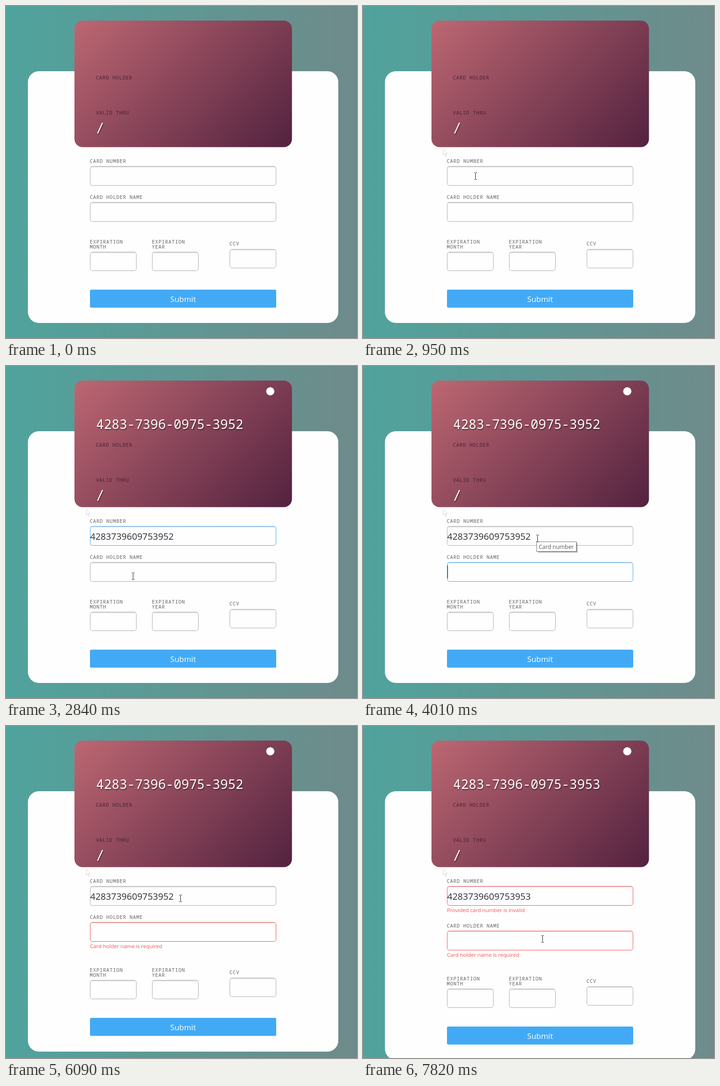
An HTML page that plays this animation: 769 by 728 pixels, repeating every 8 s.

```html
<!DOCTYPE html>
<html lang="en">
<head>
<meta charset="utf-8">
<title>Card form</title>
<style>
html, body { margin: 0; height: 100%; overflow: hidden; }
svg { display: block; width: 769px; height: 728px; }
text { font-family: "Open Sans", "Noto Sans", sans-serif; white-space: pre; }
.label { font: 300 11px "Noto Sans Mono", monospace; letter-spacing: .67px; fill: #666; }
.dark { fill: #4b2134; font-weight: 400; }
.field { fill: url(#inset); stroke: #aaa; }
.error { font-size: 11.6px; fill: #f4504d; }
.number { font: 28.3px "Noto Sans Mono", monospace; }
.slash { font: 28px "DejaVu Sans Mono", monospace; }
.lift { fill: #fff; filter: drop-shadow(1px 2px 1px #0007); }
</style>
</head>
<body>
<svg viewBox="0 0 769 728">
  <defs>
    <linearGradient id="page"><stop stop-color="#50a39d"/><stop offset="1" stop-color="#6e8b8a"/></linearGradient>
    <linearGradient id="card" gradientUnits="userSpaceOnUse" x1="199.75" y1="-17.75" x2="576.25" y2="358.75">
      <stop stop-color="#bd6772"/><stop offset="1" stop-color="#53223f"/>
    </linearGradient>
    <linearGradient id="inset" x2="0" y2="1">
      <stop stop-color="#ccc"/><stop offset=".05" stop-color="#eee"/><stop offset=".1" stop-color="#fefefe"/>
    </linearGradient>
    <path id="arrow" d="M.5 .5V13.5L3.5 10.7 5.5 16 7.5 15.2 5.5 10H9.5Z" fill="#fff"/>
  </defs>
  <rect width="769" height="728" fill="url(#page)"/>
  <rect id="panel" x="48" y="143" width="680" rx="24" fill="#fefefe"/>

  <text class="label" x="183.5" y="344">CARD NUMBER</text>
  <rect id="numField" class="field" x="184.5" y="351.5" width="407" height="42" rx="5"/>
  <text id="typed" x="184.5" y="381" font-size="20" fill="#2e2e36"></text>
  <text id="numError" class="error" x="184" y="408">Provided card number is invalid</text>

  <g data-y="430.2">
    <text class="label" x="183.5" y="-7">CARD HOLDER NAME</text>
    <rect id="nameField" class="field" x="184.5" y=".5" width="407" height="42" rx="5"/>
    <text id="nameError" class="error" x="184" y="57">Card holder name is required</text>
  </g>
  <g data-y="538.6">
    <text class="label" x="183.5" y="-18">EXPIRATION</text>
    <text class="label" x="183.5" y="-7.5">MONTH</text>
    <rect class="field" x="184.5" y=".5" width="101" height="41" rx="5"/>
    <text class="label" x="319.5" y="-18">EXPIRATION</text>
    <text class="label" x="319.5" y="-7.5">YEAR</text>
    <rect class="field" x="320.5" y=".5" width="101" height="41" rx="5"/>
  </g>
  <g data-y="533.3">
    <text class="label" x="489.5" y="-8">CCV</text>
    <rect class="field" x="490.5" y=".5" width="101" height="41" rx="5"/>
  </g>
  <g data-y="621.6">
    <rect x="184" width="408" height="39.5" rx="3" fill="#42aaf5"/>
    <text x="388" y="26.5" font-size="17" fill="#fff" text-anchor="middle">Submit</text>
  </g>

  <rect x="150" y="32" width="476.5" height="277.5" rx="18" fill="url(#card)"/>
  <g id="brand">
    <circle cx="579" cy="55.5" r="9" fill="#fff"/>
    <text id="cardNum" class="number lift" x="197.5" y="138"></text>
  </g>
  <g id="details">
    <text class="label dark" x="197" y="160.5">CARD HOLDER</text>
    <text class="label dark" x="197" y="237.5">VALID THRU</text>
    <text class="slash lift" x="198" y="276.5">/</text>
  </g>

  <use id="trace" href="#arrow" x="175.5" y="313.5" stroke="#ddd0d4"/>
  <rect id="caret" width="1" height="29" fill="#1d2b33"/>
  <g id="tip">
    <rect x="383" y="388" width="87" height="21" fill="#0005"/>
    <rect x="380.5" y="385.5" width="87" height="21" fill="#fff" stroke="#767676"/>
    <text x="385" y="400.5" font-size="12.4" fill="#575757">Card number</text>
  </g>
  <use id="pointer" href="#arrow" stroke="#000"/>
  <path id="beam" d="M-3 -7.5H-1L0 -6.5 1 -7.5H3M0 -6.5V6.5M-3 7.5H-1L0 6.5 1 7.5H3" fill="none" stroke="#111"/>
</svg>
<script>
const $ = id => document.getElementById(id);
const show = (id, on) => $(id).style.display = on ? '' : 'none';
const at = (el, x, y) => el.setAttribute('transform', `translate(${x} ${y})`);
const rows = document.querySelectorAll('[data-y]');
const ROW = 18.6, BLUE = '#42a5f5', RED = '#f4504d', GRAY = '#aaa';

// start, end, from x, y, to x, y, sideways bulge
const moves = [
  [110, 950, 3, 170, 247, 373, 0],
  [2330, 2840, 247, 373, 279, 461, 0],
  [3170, 3630, 279, 461, 383, 378, 0],
  [7490, 7820, 383, 378, 394, 467, 23],
];
// on, off, x, y
const carets = [
  [1230, 1690, 185, 358], [1970, 2480, 368, 358],
  [2940, 3450, 185, 437], [3960, 4520, 185, 437],
  [4520, 5070, 368, 358], [5580, 6090, 368, 358],
  [6370, 6650, 356, 358], [6980, 7490, 368, 358],
];

function cursor(t) {
  const [a, b, x0, y0, x1, y1, bulge] = moves.filter(m => t >= m[0]).pop() || moves[0];
  const p = Math.max(0, Math.min(1, (t - a) / (b - a)));
  const e = p * p * (3 - 2 * p);
  return [x0 + (x1 - x0) * e + bulge * Math.sin(Math.PI * e), y0 + (y1 - y0) * e].map(Math.round);
}

function draw(t) {
  const pasted = t >= 1970, invalid = t >= 6370, missing = t >= 4520;

  const digits = !pasted ? '' : '428373960975395' + (t < 6370 ? '2' : t < 6980 ? '' : '3');
  $('typed').textContent = digits;
  $('cardNum').textContent = digits.replace(/(\d{4})(?=\d)/g, '$1-');
  show('brand', pasted);
  at($('details'), 0, pasted ? 16 : 0);

  const top = invalid ? ROW : 0, shift = top + (missing ? ROW : 0);
  rows.forEach((g, i) => at(g, 0, Math.round(+g.dataset.y + (i ? shift : top))));
  $('panel').setAttribute('height', Math.round(695.2 + shift) - 143);
  show('numError', invalid);
  show('nameError', missing);
  $('numField').style.stroke = invalid ? RED : t >= 1230 && t < 2940 ? BLUE : GRAY;
  $('nameField').style.stroke = missing ? RED : t >= 2940 ? BLUE : GRAY;

  const c = carets.find(k => t >= k[0] && t < k[1]);
  show('caret', c);
  if (c) at($('caret'), c[2], c[3]);

  show('tip', t >= 4010 && t < 4750);
  $('tip').style.opacity = missing ? Math.max(0, 1 - (t - 4470) / 280) : 1;

  const [x, y] = cursor(t), inField = y > 352;
  show('pointer', t >= 110 && !inField);
  show('beam', inField);
  show('trace', x > 176);
  at($('pointer'), x - .5, y - .5);
  at($('beam'), x - .5, y);
}

function tick() {
  draw(performance.now() % 8000);
  requestAnimationFrame(tick);
}
tick();
</script>
</body>
</html>
```
